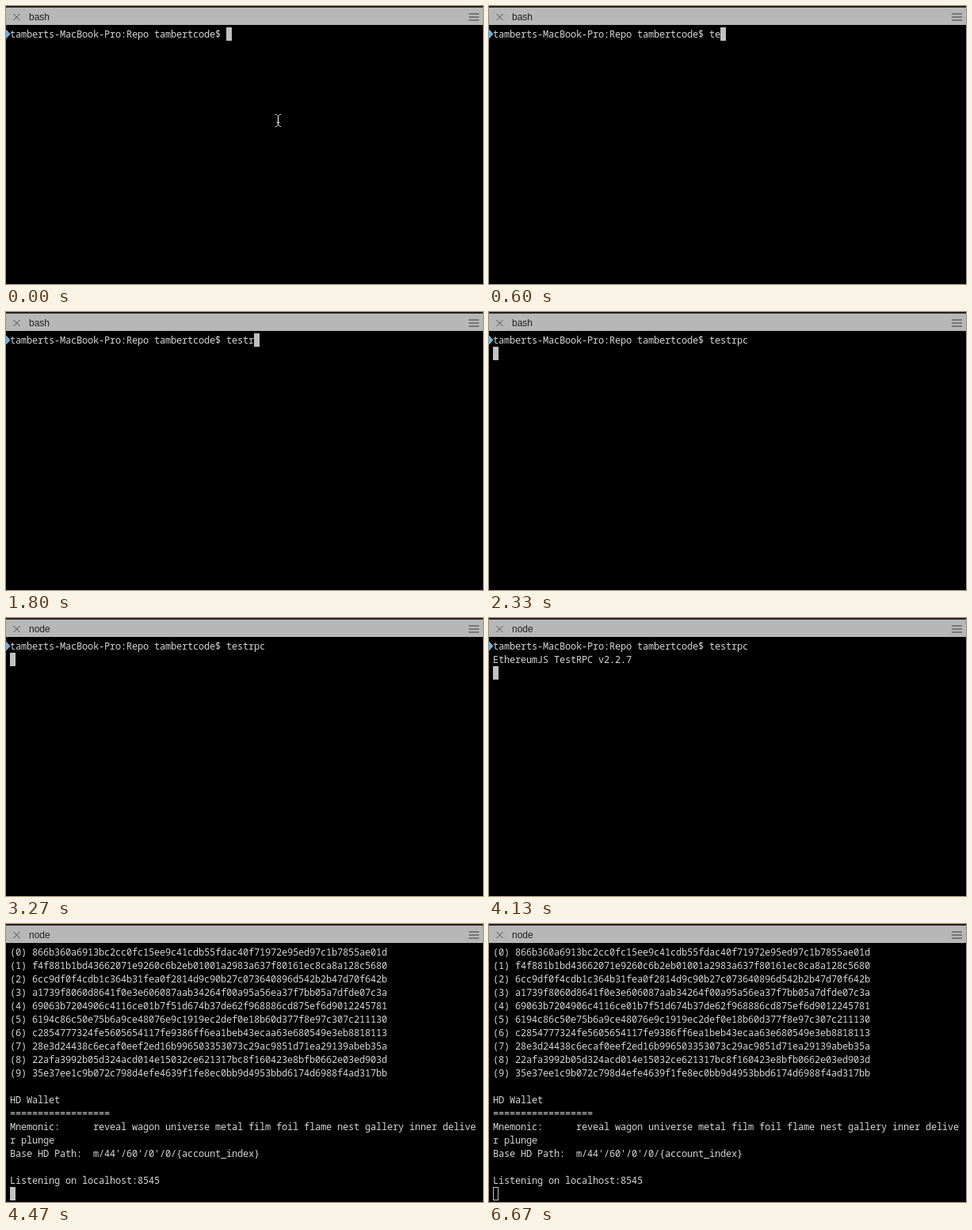
Animation, 602 px wide and 352 px high, one loop 8870 ms. Source, as an HTML page with a canvas:

```html
<!DOCTYPE html>
<html lang="en">
<head>
<meta charset="utf-8">
<title>Terminal</title>
<style>
  html, body { margin: 0; width: 100%; height: 100%; overflow: hidden; background: #000; }
  canvas { display: block; }
</style>
</head>
<body>
<canvas id="stage" width="602" height="352"></canvas>
<script>
const ctx = document.getElementById('stage').getContext('2d');
const LOOP = 8870;
const CELL = { x: 5, y: 27, w: 7, h: 17 };
const INK = '#d6d6d6';
const CURSOR = '#c1c1c1';

const PROMPT = 'tamberts-MacBook-Pro:Repo tambertcode$ ';
const COMMAND = 'testrpc';
const KEY_TIMES = [470, 600, 730, 930, 1800, 1930, 2130];
const ENTER = 2330, NODE = 3270, BANNER = 4130, OUTPUT = 4200, BLUR = 6670;

const KEYS = [
  '866b360a6913bc2cc0fc15ee9c41cdb55fdac40f71972e95ed97c1b7855ae01d',
  'f4f881b1bd43662071e9260c6b2eb01001a2983a637f80161ec8ca8a128c5680',
  '6cc9df0f4cdb1c364b31fea0f2814d9c90b27c073640896d542b2b47d70f642b',
  'a1739f8060d8641f0e3e606087aab34264f00a95a56ea37f7bb05a7dfde07c3a',
  '69063b7204906c4116ce01b7f51d674b37de62f968886cd875ef6d9012245781',
  '6194c86c50e75b6a9ce48076e9c1919ec2def0e18b60d377f8e97c307c211130',
  'c2854777324fe5605654117fe9386ff6ea1beb43ecaa63e680549e3eb8818113',
  '28e3d24438c6ecaf0eef2ed16b996503353073c29ac9851d71ea29139abeb35a',
  '22afa3992b05d324acd014e15032ce621317bc8f160423e8bfb0662e03ed903d',
  '35e37ee1c9b072c798d4efe4639f1fe8ec0bb9d4953bbd6174d6988f4ad317bb'
];
const LOG = [
  ...KEYS.map((key, i) => `(${i}) ${key}`),
  '',
  'HD Wallet',
  '='.repeat(18),
  'Mnemonic:      reveal wagon universe metal film foil flame nest gallery inner delive',
  'r plunge',
  "Base HD Path:  m/44'/60'/0'/0/{account_index}",
  '',
  'Listening on localhost:8545',
  ''
];

function rect(color, x, y, w, h) {
  ctx.fillStyle = color;
  ctx.fillRect(x, y, w, h);
}

function path(points) {
  ctx.beginPath();
  points.forEach(([x, y], i) => i ? ctx.lineTo(x, y) : ctx.moveTo(x, y));
}

function line(color, width, ...points) {
  path(points);
  ctx.strokeStyle = color;
  ctx.lineWidth = width;
  ctx.stroke();
}

function drawBar(title) {
  rect('#252122', 0, 0, 602, 2);
  rect('#b7b7b7', 0, 2, 602, 22);
  line('#4c4c4c', 1, [9.5, 10], [17.5, 18]);
  line('#4c4c4c', 1, [17.5, 10], [9.5, 18]);
  for (const y of [9, 13, 17]) rect('#777', 584, y, 13, 2);
  ctx.font = '12px "Liberation Sans", Arial, sans-serif';
  ctx.fillStyle = '#202020';
  ctx.fillText(title, 29, 18);
}

function drawMark() {
  path([[0, 30], [5, 35.5], [0, 41]]);
  ctx.fillStyle = '#68aee6';
  ctx.fill();
  line('#b5d9f5', 0.7, [0, 30], [5, 35.5], [0, 41]);
}

// One glyph per cell, as on a terminal grid.
function drawRow(text, row) {
  ctx.font = '12px "Noto Sans Mono", "DejaVu Sans Mono", monospace';
  ctx.fillStyle = INK;
  [...text].forEach((ch, col) => {
    ctx.fillText(ch, CELL.x + col * CELL.w, CELL.y + row * CELL.h + 13);
  });
}

function drawCursor(col, row, hollow) {
  const x = CELL.x + col * CELL.w, y = CELL.y + row * CELL.h;
  if (hollow) {
    ctx.strokeStyle = CURSOR;
    ctx.lineWidth = 1;
    ctx.strokeRect(x + 0.5, y + 0.5, 6, 16);
  } else {
    rect(CURSOR, x, y, 7, 17);
  }
}

function drawPointer() {
  const color = '#dedede';
  line(color, 1, [339.5, 137.5], [341.5, 137.5], [343.5, 139.5], [345.5, 137.5], [347, 137.5]);
  line(color, 1, [339.5, 152.5], [341.5, 152.5], [343.5, 150.5], [345.5, 152.5], [347, 152.5]);
  line(color, 1.3, [343.5, 139], [343.5, 151]);
  line(color, 1, [341.5, 147.5], [345.5, 147.5]);
}

function rowsAt(t) {
  if (t >= OUTPUT) return LOG;
  const typed = KEY_TIMES.filter(k => t >= k).length;
  const rows = [PROMPT + COMMAND.slice(0, typed)];
  if (t >= BANNER) rows.push('EthereumJS TestRPC v2.2.7');
  if (t >= ENTER) rows.push('');
  return rows;
}

function draw(t) {
  const rows = rowsAt(t);
  const last = rows.length - 1;
  rect('#000', 0, 0, 602, 352);
  drawBar(t < NODE ? 'bash' : 'node');
  if (t < OUTPUT) drawMark();
  rows.forEach(drawRow);
  drawCursor(rows[last].length, last, t >= BLUR);
  if (t < KEY_TIMES[0]) drawPointer();
}

const start = performance.now();
function tick() {
  draw((performance.now() - start) % LOOP);
  requestAnimationFrame(tick);
}
tick();
</script>
</body>
</html>
```
